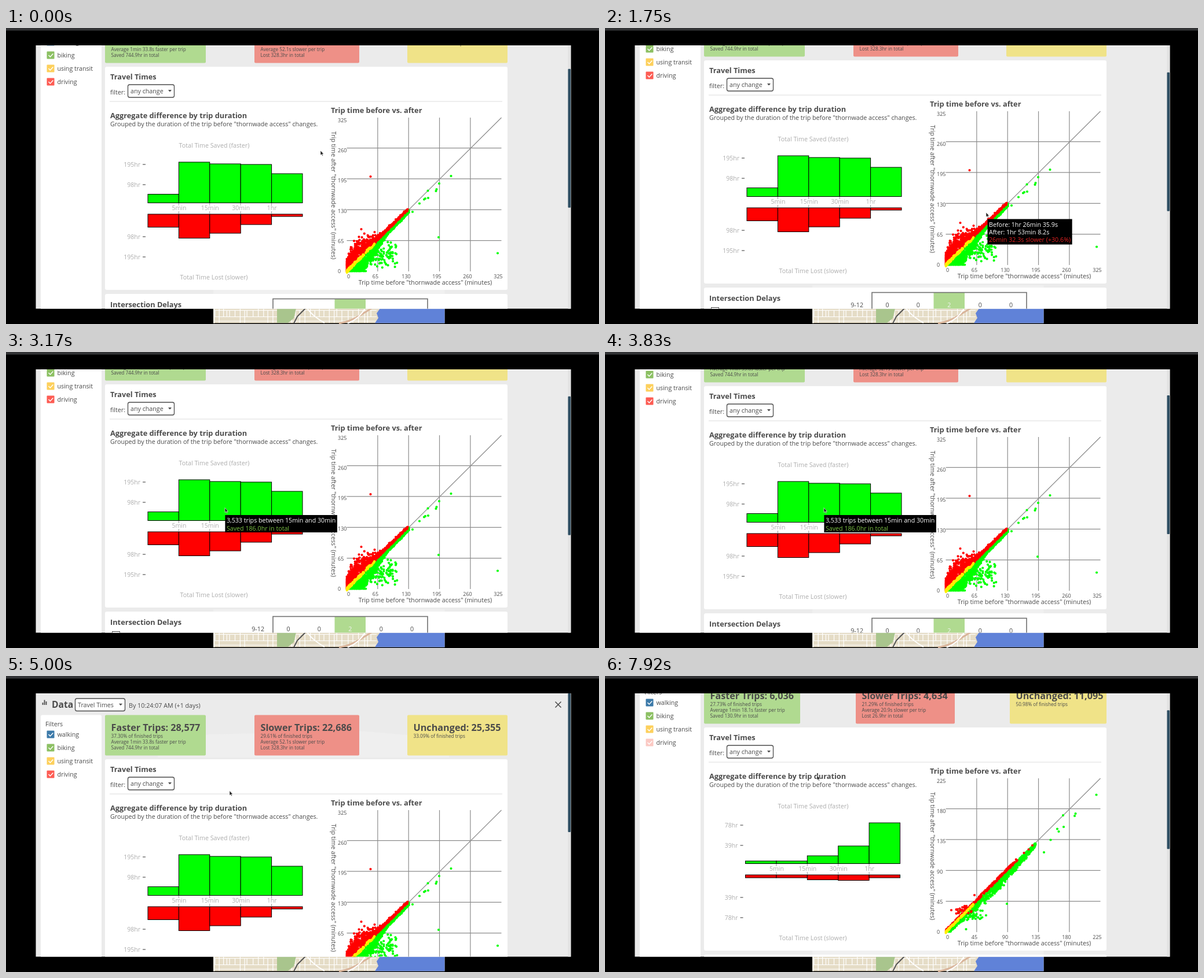
Recreate the animation shown at these times as an HTML page. Size 1024 by 512 pixels, loop 8 s.

```html
<!DOCTYPE html>
<html lang="en">
<head>
<meta charset="utf-8">
<title>Trip data panel</title>
<style>
  html, body { margin: 0; width: 100%; height: 100%; overflow: hidden; background: #000; }
  svg { display: block; width: 100vw; height: 100vh; font-family: "Open Sans", "Noto Sans", sans-serif; }
  text { white-space: pre; }
</style>
</head>
<body>
<svg id="stage" viewBox="0 0 1024 512"></svg>
<script>
const INK = '#4b4b4b', FAINT = '#adadad', GREEN = '#00ff00', RED = '#ff0000';
const CHANGE = '"thornwade access"';
const LOOP = 8000;

const rect = (x, y, w, h, fill, extra = '') =>
  `<rect x="${x}" y="${y}" width="${w}" height="${h}" fill="${fill}" ${extra}/>`;
const path = (d, stroke, width = 1, extra = '') =>
  `<path d="${d}" fill="none" stroke="${stroke}" stroke-width="${width}" ${extra}/>`;
// y is the middle of the capitals
const text = (x, y, str, { size = 10.7, bold, fill = INK, anchor = 'start', extra = '' } = {}) =>
  `<text x="${x}" y="${y + size * 0.36}" font-size="${size}" font-weight="${bold ? 700 : 400}" ` +
  `fill="${fill}" text-anchor="${anchor}" ${extra}>${str}</text>`;
const select = (x, y, w, h, label) =>
  rect(x, y, w, h, '#fff', `rx="3" stroke="${INK}" stroke-width="1.3"`) +
  text(x + 4.5, y + h / 2 + 0.5, label) +
  `<path d="M${x + w - 10.5} ${y + h / 2 - 2}h6l-3 3.5z" fill="${INK}"/>`;

function random(seed) {
  return () => {
    seed = (seed + 0x6D2B79F5) | 0;
    let n = Math.imul(seed ^ (seed >>> 15), 1 | seed);
    n = (n + Math.imul(n ^ (n >>> 7), 61 | n)) ^ n;
    return ((n ^ (n >>> 14)) >>> 0) / 4294967296;
  };
}
const bump = (x, mid, spread) => Math.exp(-(((x - mid) / spread) ** 2));

// ---- chart data: all trips, and trips without driving ----
const all = {
  cards: [
    [171, 174, 'Faster Trips: 28,577', '37.30% of finished trips', 'Average 1min 33.8s faster per trip', 'Saved 744.9hr in total'],
    [429, 181, 'Slower Trips: 22,686', '29.61% of finished trips', 'Average 52.1s slower per trip', 'Lost 328.3hr in total'],
    [693, 173, 'Unchanged: 25,355', '33.09% of finished trips']],
  left: 245, hours: ['195hr', '98hr'],
  saved: [15, 70.5, 67.5, 66.5, 50.5], lost: [22.5, 41.5, 33, 18, 4],
  unit: 65,
  cloud(rnd) {
    const green = [], red = [], yellow = [];
    for (let i = 0; i < 1000; i++) {
      const x = 3 + 105 * rnd() ** 1.15;
      const depth = 6 + 21 * bump(x, 33, 22);
      green.push([x, Math.max(0.5, x - depth * (rnd() + 0.35 * rnd() ** 6))]);
    }
    for (let i = 0; i < 95; i++) green.push([45 + 42 * rnd(), 30 + 26 * (rnd() + rnd() - 1)]);
    for (let i = 0; i < 800; i++) {
      const x = 106 * rnd() ** 2;
      const rise = 3 + 5 * bump(x, 0, 60) + 21 * bump(x, 20, 21);
      red.push([x, x + rise * (rnd() + 0.8 * rnd() ** 7)]);
    }
    red.push([41, 164], [25, 73], [48, 68], [104.5, 104]);
    for (let i = 0; i < 110; i++) {
      const x = 48 * rnd() ** 1.5;
      yellow.push([x, x + 5 * rnd() - 2.5]);
    }
    green.push([180, 165], [158.5, 59], [260.5, 31.5], [159.5, 152], [155, 142], [154, 139],
      [140, 139.5], [133.5, 124.5], [135.5, 126], [140.5, 127], [125.5, 117.5], [113.5, 103]);
    return { green, red, yellow };
  }
};
const noDriving = {
  cards: [
    [171, 166, 'Faster Trips: 6,036', '27.73% of finished trips', 'Average 1min 18.1s faster per trip', 'Saved 130.9hr in total'],
    [433, 171, 'Slower Trips: 4,634', '21.29% of finished trips', 'Average 20.9s slower per trip', 'Lost 26.9hr in total'],
    [699, 167, 'Unchanged: 11,095', '50.98% of finished trips']],
  left: 242.5, hours: ['78hr', '39hr'],
  saved: [4.5, 4.5, 13.5, 30.5, 70.5], lost: [5, 5, 8.5, 9.5, 5],
  unit: 45,
  cloud(rnd) {
    const green = [], red = [], yellow = [];
    for (let i = 0; i < 750; i++) {
      const x = 4 + 152 * rnd();
      green.push([x, Math.max(1, x - (5 + 9 * bump(x, 85, 60)) * (rnd() + 0.5 * rnd() ** 6))]);
    }
    for (let i = 0; i < 32; i++) green.push([24 + 42 * rnd(), 20 + 18 * rnd()]);
    for (let i = 0; i < 260; i++) {
      const x = 125 * rnd();
      red.push([x, x + 4.5 * rnd()]);
    }
    for (let i = 0; i < 38; i++) red.push([18 + 27 * rnd(), 32 + 14 * rnd()]);
    red.push([9.5, 38], [49.5, 64], [149.5, 150], [143, 143], [135, 137]);
    for (let i = 0; i < 140; i++) {
      const x = 48 * rnd() ** 1.4;
      yellow.push([x, x + 3 * rnd() - 1.5]);
    }
    green.push([260, 237.5], [224, 205], [222.5, 201], [202.5, 202], [203.5, 182], [192.5, 178.5],
      [195, 174], [181, 159.5], [169.5, 138], [105.5, 49], [69.5, 29], [35, 5]);
    return { green, red, yellow };
  }
};

function summary(cards) {
  const fills = ['#b0da90', '#ee9087', '#f0e388'];
  return cards.map(([x, w, title, ...lines], i) =>
    rect(x, 67.5, w, 70, fills[i], 'rx="2"') +
    text(x + 10.5, 89.5, title, { size: 16.2, bold: true }) +
    lines.map((line, n) => text(x + 10.5, 104 + n * 10.2, line, { size: 8.2 })).join('')).join('');
}

function histogram({ left, hours, saved, lost }) {
  const step = 53.4, style = 'stroke="#000" stroke-width="1"';
  let out = text(359.5, 280.5, 'Total Time Saved (faster)', { fill: FAINT, anchor: 'middle' }) +
    text(359, 508.5, 'Total Time Lost (slower)', { fill: FAINT, anchor: 'middle' });
  [[313, 0], [348, 1], [438, 1], [473, 0]].forEach(([y, n]) => {
    out += text(left - 13, y, hours[n], { size: 10.5, fill: FAINT, anchor: 'end' }) +
      path(`M${left - 9} ${y}h5`, '#777', 1.3);
  });
  saved.forEach((h, i) => {
    const x = left + i * step;
    out += rect(x, 379.5 - h, step, h, GREEN, style) + rect(x, 399, step, lost[i], RED, style);
  });
  ['5min', '15min', '30min', '1hr'].forEach((label, i) => {
    const x = left + (i + 1) * step;
    out += path(`M${x} 380v4M${x} 394v5`, '#999') +
      text(x + 0.5, 388.5, label, { size: 10.5, fill: FAINT, anchor: 'middle' });
  });
  return out;
}

function scatter({ unit, cloud }) {
  const x0 = 588.5, y0 = 498, step = 53.35;
  let grid = `M${x0} ${y0}L855.5 232`, out = '';
  for (let i = 1; i < 5; i++) grid += `M${x0 + i * step} 232V${y0}M${x0} ${y0 - i * step}H855.5`;
  out += path(grid, '#8c8c8c', 1.2);
  for (let i = 0; i <= 5; i++) {
    out += text(573, 497.5 - i * 52.1, i * unit, { size: 9 }) +
      text(i ? 585 + i * 53 : 591.5, 506.5, i * unit, { size: 9, anchor: 'middle' });
  }
  const points = cloud(random(7));
  const dots = (list, color) => path(list.map(([x, y]) =>
    `M${(x0 + x).toFixed(1)} ${(y0 - y).toFixed(1)}h.01`).join(''), color, 4.2, 'stroke-linecap="round"');
  return out + dots(points.green, GREEN) + dots(points.red, RED) + dots(points.yellow, '#ffee00') +
    text(561, 219, 'Trip time before vs. after', { size: 12.75, bold: true }) +
    text(724, 517.5, `Trip time before ${CHANGE} (minutes)`, { anchor: 'middle' }) +
    text(0, 0, `Trip time after ${CHANGE} (minutes)`,
      { anchor: 'middle', extra: 'transform="translate(566 366.5) rotate(90)"' });
}

function page(data) {
  return summary(data.cards) +
    rect(171, 144, 695, 386, '#fff', 'rx="3"') +
    text(180, 161, 'Travel Times', { size: 12.75, bold: true }) +
    text(180, 188, 'filter:') + select(210.5, 175, 80, 22, 'any change') +
    path('M179 204H857', '#dcdcdc') +
    text(180, 228, 'Aggregate difference by trip duration', { size: 12.75, bold: true }) +
    text(180, 243, `Grouped by the duration of the trip before ${CHANGE} changes.`) +
    histogram(data) + scatter(data);
}

const rowY = i => 101 + i * 23;
const modes = [['walking', '#3c7aa9'], ['biking', '#8cc063'], ['using transit', '#fdd05c'], ['driving', '#fd5c53']];

function chrome() {
  return path('M63.5 46v4M66.5 41.5v8.5M69.5 44v6', INK, 1.8) +
    text(79, 49.5, 'Data', { size: 15.6, bold: true }) +
    select(119.5, 39, 86, 21.5, 'Travel Times') +
    text(212, 51, 'By 10:24:07 AM (+1 days)') +
    path('M948.5 44.5l10 10m0-10l-10 10', INK, 1.5) +
    rect(60, 67.5, 105, 600, '#fff', 'rx="3"') +
    text(68, 83, 'Filters') +
    rect(69, 0, 58, 17, '#efefef', 'id="hover" rx="4"') +
    modes.map(([name, color], i) =>
      rect(70.5, rowY(i) - 6.5, 13, 13, color, `rx="1" ${i === 3 ? 'id="driving"' : ''}`) +
      path(`M73.5 ${rowY(i)}l2.8 3 5-5.5`, '#fff', 1.4) +
      text(88.5, rowY(i) + 0.5, name)).join('') +
    rect(171, 537, 695, 200, '#fff', 'rx="3"') +
    text(180, 555, 'Intersection Delays', { size: 12.75, bold: true }) +
    rect(183.5, 571.5, 13, 13, '#fff', `stroke="${INK}"`) +
    rect(567.5, 546, 53.5, 60, '#b0da90') +
    rect(461, 545.5, 267, 80, 'none', 'stroke="#707070" stroke-width="1.6"') +
    text(446, 567, '9-12', { anchor: 'end' }) +
    [0, 0, 2, 0, 0].map((n, i) =>
      text(487.5 + i * 53.4, 567, n, { anchor: 'middle', fill: n ? '#f4f4f4' : INK })).join('');
}

function cityMap() {
  const rnd = random(3);
  let streets = 'M358 488.5H640M358 499.5H640M358 507H640';
  for (let x = 361; x < 640; x += 4 + 7 * rnd()) streets += `M${x.toFixed(1)} ${rnd() < 0.5 ? 485 : 489}V${rnd() < 0.5 ? 500 : 510}`;
  return rect(358, 485, 399.5, 25.5, '#e5dcc6') +
    path(streets, '#fff', 1.2) +
    rect(358, 485, 2.5, 25.5, '#f6f3ea') +
    '<path d="M468 485h33l-4 17-10 8h-19z" fill="#a9c58d"/>' +
    '<path d="M646 485H757.5V510.5H637l6-9-3-8z" fill="#6082d8"/>' +
    path('M497 511l6-12 14-14', '#555', 2) +
    path('M575 511q22-4 38-15l18-11', '#d9b49a', 3) +
    path('M590 511q20-8 30-26M520 485q10 14 30 25', '#fff', 2);
}

document.getElementById('stage').innerHTML =
  '<clipPath id="panel"><rect x="51.5" y="30" width="924" height="455.5"/></clipPath>' +
  rect(0, 0, 1024, 512, '#000') + rect(0, 0, 1024, 4.5, '#323335') + cityMap() +
  '<g clip-path="url(#panel)">' + rect(51, 30, 925, 456, '#ebebeb') +
  '<path d="M262 112L350 101 610 95 765 108V141H262z" fill="#efefef"/>' +
  rect(358, 445, 399.5, 41, '#f0f0f0') +
  `<g id="content">${chrome()}<g id="all">${page(all)}</g><g id="noDriving">${page(noDriving)}</g></g>` +
  rect(970.5, 30, 5, 456, '#e2e2e2') + rect(970.5, 30, 4.5, 240, '#2f4f63', 'id="thumb" rx="1"') + '</g>' +
  '<g id="tip"></g>' +
  '<g id="arrow"><path d="M0 0v8l1.9-1.6 1.3 2.8 1.3-.6-1.3-2.7h2.5z" fill="#222" stroke="#fff" stroke-width=".6"/></g>' +
  '<g id="hand"><path d="M.2 1.2q1.2-1.2 2 .3l1 2.8 3.2.8q1.2.4.9 1.8l-.7 3.3H2.3L-.9 6.8q.2-1.4 1.9-.3z" fill="#fff" stroke="#222" stroke-width=".9"/></g>';

// ---- timeline ----
const scrolls = [[0, 77], [80, 88], [3750, 85], [3833, 78], [3920, 69], [4250, 62], [4330, 51],
  [4420, 38], [4580, 11], [4665, 0], [7750, 12], [7833, 34], [7915, 55]];
const moves = [[0, 543, 212], [200, 543, 212], [330, 560, 255], [500, 602, 338], [670, 626, 375],
  [780, 626, 375], [1000, 592, 358], [1200, 625, 350], [1420, 668, 341], [1540, 668, 341],
  [1750, 658.5, 318.5], [1920, 641, 335], [2040, 641, 335], [2250, 545, 355], [2420, 462, 290], [2520, 436, 274],
  [2670, 428, 302], [2850, 428, 302], [3165, 378, 269.5], [4850, 378, 269.5], [5000, 386, 198.5],
  [5360, 386, 198.5], [5540, 260, 125], [5670, 177, 113], [5860, 177, 113], [6080, 110, 148], [6250, 90, 173],
  [6690, 90, 173], [6850, 92, 175], [7000, 86, 172], [7260, 86, 172], [7420, 366, 172]];

const stepAt = (keys, t) => keys.reduce((value, [at, v]) => (t >= at ? v : value), keys[0][1]);

// the pointer is sampled twelve times a second
function pointerAt(t) {
  const tick = Math.floor((t + 5) * 12 / 1000) * 1000 / 12 + 5;
  const next = moves.findIndex(m => m[0] > tick);
  if (next < 0) return moves[moves.length - 1].slice(1);
  const a = moves[next - 1], b = moves[next], k = (tick - a[0]) / (b[0] - a[0]);
  return [1, 2].map(i => a[i] + (b[i] - a[i]) * k);
}

function duration(seconds) {
  const h = Math.floor(seconds / 3600), m = Math.floor(seconds / 60) % 60;
  return (h ? h + 'hr ' : '') + (h || m ? m + 'min ' : '') + (seconds % 60).toFixed(1) + 's';
}

function tipLines(t, x, y, row) {
  if (t >= 580 && t < 2080) {
    const before = 5233.6 + (x - 658.5) * 73.2, after = 6823.7 - (y - 318.5) * 73.2;
    const diff = after - before, slower = diff > 0;
    return [['Before: ' + duration(before)], ['After: ' + duration(after)],
      [`${duration(Math.abs(diff))} ${slower ? 'slower (+' : 'faster (-'}${(Math.abs(diff) / before * 100).toFixed(1)}%)`,
        slower ? '#e32222' : '#7bc043']];
  }
  if (t >= 2400 && t < 4580) {
    const [trips, range, saved] = x > 405 ? ['2,874', '30min and 1hr', '184.7'] : ['3,533', '15min and 30min', '186.0'];
    return [[`${trips} trips between ${range}`], [`Saved ${saved}hr in total`, '#7bc043']];
  }
  return row >= 0 ? [[modes[row][0]]] : [];
}

const ui = {};
for (const id of ['content', 'all', 'noDriving', 'thumb', 'tip', 'arrow', 'hand', 'hover', 'driving']) {
  ui[id] = document.getElementById(id);
}
const show = (el, on) => el.setAttribute('display', on ? 'inline' : 'none');
const place = (el, x, y) => el.setAttribute('transform', `translate(${x} ${y})`);

let lastTip = '';
function drawTip(lines, x, y, small) {
  place(ui.tip, x, y);
  const key = lines.join('|');
  if (key === lastTip) return;
  lastTip = key;
  const size = small ? 8.2 : 10.7;
  ui.tip.innerHTML = lines.map(([str, fill = '#fff'], i) =>
    text(2.5, (small ? 8 : 9.5) + i * 13.3, str, { size, fill })).join('');
  if (!lines.length) return;
  const width = Math.max(...[...ui.tip.children].map(el => el.getComputedTextLength())) + 5;
  ui.tip.insertAdjacentHTML('afterbegin', rect(0, 0, width, small ? 15.5 : lines.length * 14 + 2, '#000'));
}

function render(t) {
  const scroll = stepAt(scrolls, t), [x, y] = pointerAt(t), filtered = t >= 7245;
  const row = x > 69 && x < 128 ? modes.findIndex((m, i) => Math.abs(y + 1 - rowY(i)) < 9) : -1;
  place(ui.content, 0, -scroll);
  ui.thumb.setAttribute('y', 30 + scroll * 0.53);
  show(ui.all, !filtered);
  show(ui.noDriving, filtered);
  ui.driving.setAttribute('fill', filtered ? '#fbc9c3' : modes[3][1]);
  show(ui.hover, row >= 0);
  if (row >= 0) ui.hover.setAttribute('y', rowY(row) - 8.5);
  show(ui.arrow, row < 0);
  show(ui.hand, row >= 0);
  place(ui.arrow, x, y);
  place(ui.hand, x - 0.5, y);
  drawTip(filtered ? [] : tipLines(t, x, y, row), x + (t < 2080 ? 2.5 : 0.4), y + (t < 2080 ? 11.5 : 12.5), row >= 0);
}

const start = performance.now();
function frame() {
  render((performance.now() - start) % LOOP);
  requestAnimationFrame(frame);
}
frame();
</script>
</body>
</html>
```
